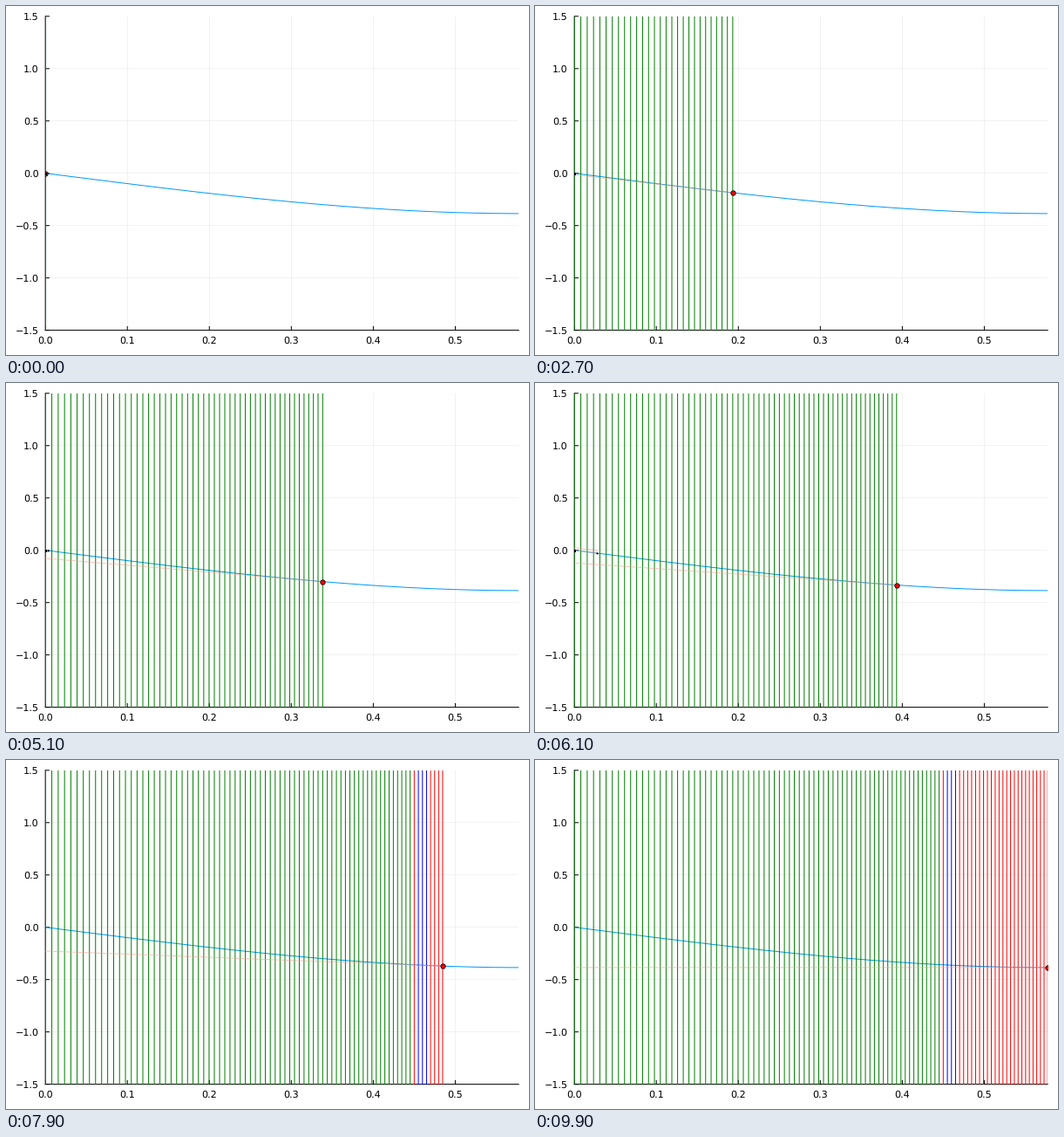
Write a matplotlib script that moves like this. It is 600 px wide and 400 px high and loops after 10 s.

```python
import numpy as np
import matplotlib.pyplot as plt
from matplotlib.animation import FuncAnimation

W, H, DPI = 600, 400, 72          # at 72 dpi one point is one pixel
LEFT, RIGHT, TOP, BOTTOM = 45.16, 588.19, 11.81, 371.61
TICK = 4.72
FRAMES, STEPS = 100, 40
X_END = 1 / np.sqrt(3)            # the derivative vanishes here
ROOT_COLORS = {-1: "red", 0: "green", 1: "blue"}

plt.rcParams.update({"font.family": "DejaVu Sans", "font.size": 11.1,
                     "text.hinting": "none", "path.snap": False})


def f(x):
    return x**3 - x


def newton(x):
    """Iterates of Newton's method for f, kept in a drawable range."""
    xs = [x]
    for _ in range(STEPS):
        slope = 3 * x * x - 1
        if abs(slope) < 1e-9:
            slope = -1e-9
        x = float(np.clip(x - f(x) / slope, -1e4, 1e4))
        xs.append(x)
    return np.array(xs)


def staircase(xs):
    """Tangent down to the axis, then straight to the curve, and so on."""
    px = np.repeat(xs, 2)[1:]
    py = np.zeros(len(px))
    py[0::2] = f(xs)
    return px, py


starts = np.log(np.linspace(1, np.exp(X_END), FRAMES))
orbits = [newton(x) for x in starts]

fig = plt.figure(figsize=(W / DPI, H / DPI), dpi=DPI, facecolor="white")
ax = fig.add_axes([LEFT / W, 1 - BOTTOM / H,
                   (RIGHT - LEFT) / W, (BOTTOM - TOP) / H])
x_ticks, y_ticks = np.arange(6) / 10, np.arange(-3, 4) / 2
ax.set(xlim=(0, X_END), ylim=(-1.5, 1.5), xticks=x_ticks, yticks=y_ticks)
ax.xaxis.set_major_formatter("{x:.1f}")
ax.yaxis.set_major_formatter(
    lambda y, _: f"{y:.1f}".replace("-", "\N{MINUS SIGN}"))
ax.tick_params(length=0)
ax.tick_params(axis="x", pad=7.2)
ax.tick_params(axis="y", pad=7.6)
ax.spines[["top", "right"]].set_visible(False)
ax.spines[["left", "bottom"]].set_linewidth(1)
ax.grid(color="black", alpha=0.1, linewidth=0.5)
ax.set_axisbelow(True)

# Inward ticks as plain lines, so that they are not snapped to pixels.
x_len = TICK * X_END / (RIGHT - LEFT)
y_len = TICK * 3 / (BOTTOM - TOP)
ax.vlines(x_ticks, -1.5, -1.5 + y_len, color="black", lw=1, zorder=1.5)
ax.hlines(y_ticks, 0, x_len, color="black", lw=1, zorder=1.5, clip_on=False)

grid_x = np.linspace(0, X_END, 200)
ax.plot(grid_x, f(grid_x), color="#009afa", lw=1, zorder=2)
bars = [ax.axvline(x, color=ROOT_COLORS[int(round(orbit[-1]))], lw=1, zorder=2.6)
        for x, orbit in zip(starts, orbits)]
path, = ax.plot([], [], color="#eba096", alpha=0.6, lw=1, zorder=3)
start, = ax.plot([], [], "o", ms=5.4, mfc="red", mec="black", mew=0.8, zorder=4)
dots, = ax.plot([], [], "o", ms=1.2, mfc="black", mec="black", mew=0.8, zorder=5)


def update(i):
    xs = orbits[i]
    path.set_data(*staircase(xs))
    start.set_data(xs[:1], f(xs[:1]))
    dots.set_data(xs[1:], f(xs[1:]))
    for k, bar in enumerate(bars):
        bar.set_visible(k <= i)
    return [path, start, dots, *bars]


anim = FuncAnimation(fig, update, frames=FRAMES, interval=100,
                     repeat=True, repeat_delay=0, blit=False)
plt.show()
```
